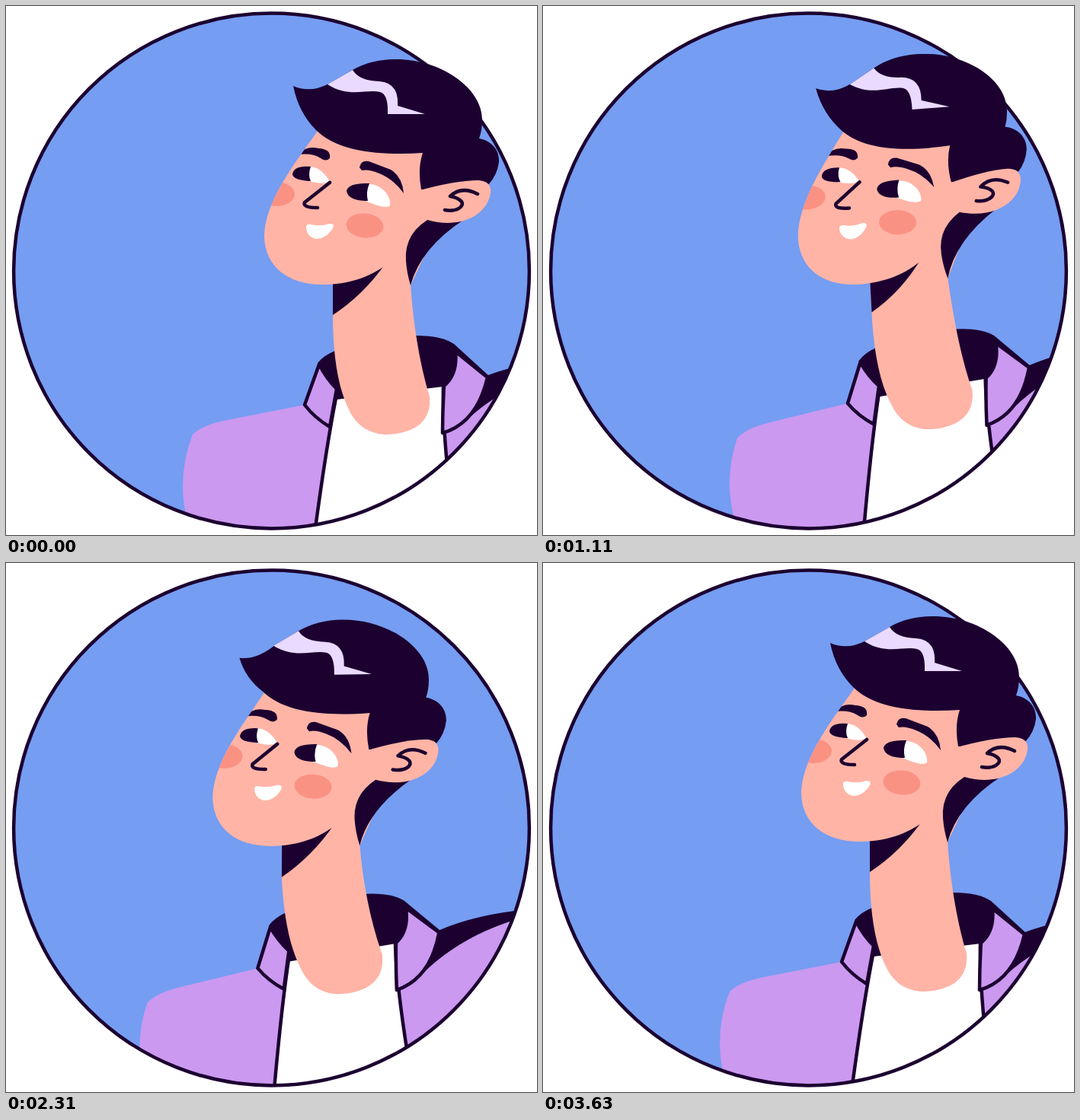
Recreate the animation shown at these times as an HTML page. Size 697 by 695 pixels, loop 3.66 s.

```html
<!DOCTYPE html>
<html lang="en">
<head>
<meta charset="utf-8">
<title>Portrait</title>
<style>
  html, body { margin: 0; width: 100%; height: 100%; overflow: hidden; background: #fff; }
  svg { display: block; width: 697px; height: 695px; }
  .dark { fill: #1c0130; }
  .skin { fill: #ffb4a6; }
  .blush { fill: #fa9284; }
  .cloth { fill: #cb99f0; }
  .white { fill: #fff; }
  .line { stroke: #1c0130; stroke-width: 4.5; stroke-linecap: round; stroke-linejoin: round; }
  .open { fill: none; }
</style>
</head>
<body>
<svg viewBox="0 0 697 695">
  <defs>
    <circle id="frame" cx="348.5" cy="348" r="338.4"/>
    <clipPath id="disc"><use href="#frame"/></clipPath>
    <path id="faceShape" d="M425 140C398 185 339 248 339 303C340 343 371 366 415 366C450 366 478 356 499 340L531 367L570 284L575 180Z"/>
    <clipPath id="faceClip"><use href="#faceShape"/></clipPath>
  </defs>

  <use href="#frame" fill="#759df2"/>
  <g clip-path="url(#disc)">
    <g id="body">
      <path class="dark" d="M409 469Q417 459 432 453L538 433Q572 433 588 444L634 486L574 530L436 530Z"/>
      <path class="white" d="M434 517L574 500L577 597L595 740H390L420 600Z"/>
      <path class="cloth" d="M245 563Q258 550 290 544L392 524L434 510Q418 590 399 740H240L236 668Q225 614 245 563Z"/>
      <path class="cloth" d="M574 500L632 488L760 466V740H595L577 597Z"/>
      <path class="dark" d="M630 486Q685 465 760 463V470Q668 487 608 541Z"/>
      <path class="line open" d="M434 510Q418 590 399 740M574 500Q572 570 595 740"/>
      <path id="leftFlap" class="cloth line"/>
      <path id="rightFlap" class="cloth line"/>
    </g>
  </g>
  <use href="#frame" class="line open"/>

  <path id="neck" class="skin"/>
  <path id="shade" class="dark"/>

  <g id="head">
    <g id="face">
      <use href="#faceShape" class="skin"/>
      <path class="dark" d="M562 276Q522 296 525 335Q526 350 531 367Q544 318 602 280Z"/>
      <g clip-path="url(#faceClip)">
        <g id="features">
          <g class="blush">
            <ellipse cx="355" cy="247" rx="24" ry="16"/>
            <ellipse cx="471" cy="288.5" rx="24.5" ry="16" transform="rotate(5 471 288.5)"/>
          </g>
          <path class="dark" d="M464 212Q466 202 476 204L505 215Q520 224 522 246Q508 227 490 220Q476 214 467 216ZM384 195Q394 183 410 187Q427 188 425 200Q420 205 413 200Q402 193 384 195Z"/>
          <path class="white" d="M475 234C492 233 506 249 504 262Q499 268 472 256ZM398 211Q413 211 424 229Q420 236 398 230Z"/>
          <path class="dark" d="M447 243Q449 232 477 233Q472 245 475 256Q449 256 447 243ZM376 221Q378 209 400 211Q396 222 400 230Q377 229 376 221Z"/>
          <path class="line open" d="M425 232L392 258Q389 265 409 265"/>
          <path class="white" d="M394 290Q395 286 400 287Q413 290 424 286Q432 285 429 292Q420 306 407 306Q394 303 394 290Z"/>
        </g>
      </g>
    </g>
    <path id="hair" class="dark"/>
    <path fill="#ebdaff" d="M422 103L455 84Q463 98 490 99Q516 101 514 131L550 142H501Q502 116 491 113C473 109 450 121 422 103Z"/>
    <path class="skin" d="M540 243Q590 229 620 229Q638 230 636 246C631 276 595 293 553 281Z"/>
    <path class="line open" d="M576 268C592 271 602 263 598 257Q594 252 583 250Q598 236 619 247"/>
  </g>
</svg>
<script>
const HALF = 1830; // one half of the loop: drift, wind up, dip across to the other side
const HEAD = [510.5, 215.5], BODY = [480, 540];

const $ = id => document.getElementById(id);
const draw = (id, d) => $(id).setAttribute('d', d);
const shift = (id, x, y) => $(id).setAttribute('transform', `translate(${x} ${y})`);

function ease(t, from, to) {
  const u = Math.min(1, Math.max(0, (t - from) / (to - from)));
  return u * u * (3 - 2 * u);
}

// Rises over [a, b], falls over [c, d].
const bump = (t, a, b, c, d) => ease(t, a, b) * (1 - ease(t, c, d));

// Moves a part by (dx, dy), turns it about its pivot and returns a mapper for its points.
function place(id, [px, py], dx, dy, angle) {
  $(id).setAttribute('transform', `translate(${dx} ${dy}) rotate(${angle} ${px} ${py})`);
  const r = angle * Math.PI / 180, c = Math.cos(r), s = Math.sin(r);
  return (x, y) => [
    px + dx + (x - px) * c - (y - py) * s,
    py + dy + (x - px) * s + (y - py) * c
  ];
}

function render(now) {
  const t = now % (2 * HALF), p = t % HALF;
  const slide = ease(p, 1150, 1480);
  const side = t < HALF ? slide : 1 - slide; // 0 right, 1 left
  const drift = bump(p, 250, 1050, 1470, 1800);
  const windup = bump(p, 900, 1110, 1170, 1430);
  const dip = bump(p, 1170, 1450, 1470, 1780);
  const tip = 14 * side * (1 - .3 * drift) - 5 * dip;

  const head = place('head', HEAD,
    -65.6 * side - (11 + 6 * side) * drift - 30 * dip,
    4.5 * side - 7 * windup + 17 * dip,
    -4.3 * drift - 14.2 * dip);
  const body = place('body', BODY,
    -61 * side + 8.6 * windup * (1 - side) + 8 * dip,
    4.3 * side - 6 * windup + 18 * dip,
    -2.65 * Math.max(side, windup) - .6 * dip);
  shift('face', -7 * dip, -3 * dip);
  shift('features', 0, 10 * dip);

  const side1 = body(429 - 8 * dip, 406 + 6 * dip);
  const jaw = head(429 - 18 * dip, 362);
  const nape = head(531 - 7 * dip, 364);
  draw('neck', `M${head(440, 330)}L${jaw}L${side1}
    C${body(429, 455)} ${body(435, 500)} ${body(450, 530)}
    C${body(460, 553)} ${body(480, 563)} ${body(500, 563)}
    C${body(536, 562)} ${body(559, 546)} ${body(556, 513)}
    C${body(543, 470)} ${head(534 - 7 * dip, 415)} ${nape}L${head(540, 295)}Z`);
  draw('shade', `M${head(440, 345)}L${jaw}L${side1}Q${head(470 - 7 * dip, 379)} ${head(499 - 7 * dip, 337)}Z`);

  draw('hair', `M377 ${105 + tip}Q399 ${115 + tip / 2} 424 102L455 84C473 74 491 70 512 70
    C572 70 626 109 625 150Q625 163 621 174C638 177 648 190 647 205Q645 222 633 235
    L600 245L545 241Q540 214 547 193C485 197 434 190 407 163Q384 ${140 + tip / 3} 377 ${105 + tip}Z`);

  draw('leftFlap', `M411 471L${392 - 5 * dip} ${524 - 4 * dip}
    Q${405 - 8 * dip} ${541 - 5 * dip} ${425 - 16 * dip} ${553 - 2 * dip}L434 503Q421 490 411 471Z`);
  draw('rightFlap', `M590 454L632 488Q${618 + 4 * dip} ${548 - 8 * dip} ${573 + 18 * dip} ${561 - 12 * dip}
    Q${573 + 3 * dip} 530 575 499Q593 484 590 454Z`);

  requestAnimationFrame(() => render(performance.now() - start));
}

const start = performance.now();
render(0);
</script>
</body>
</html>
```
